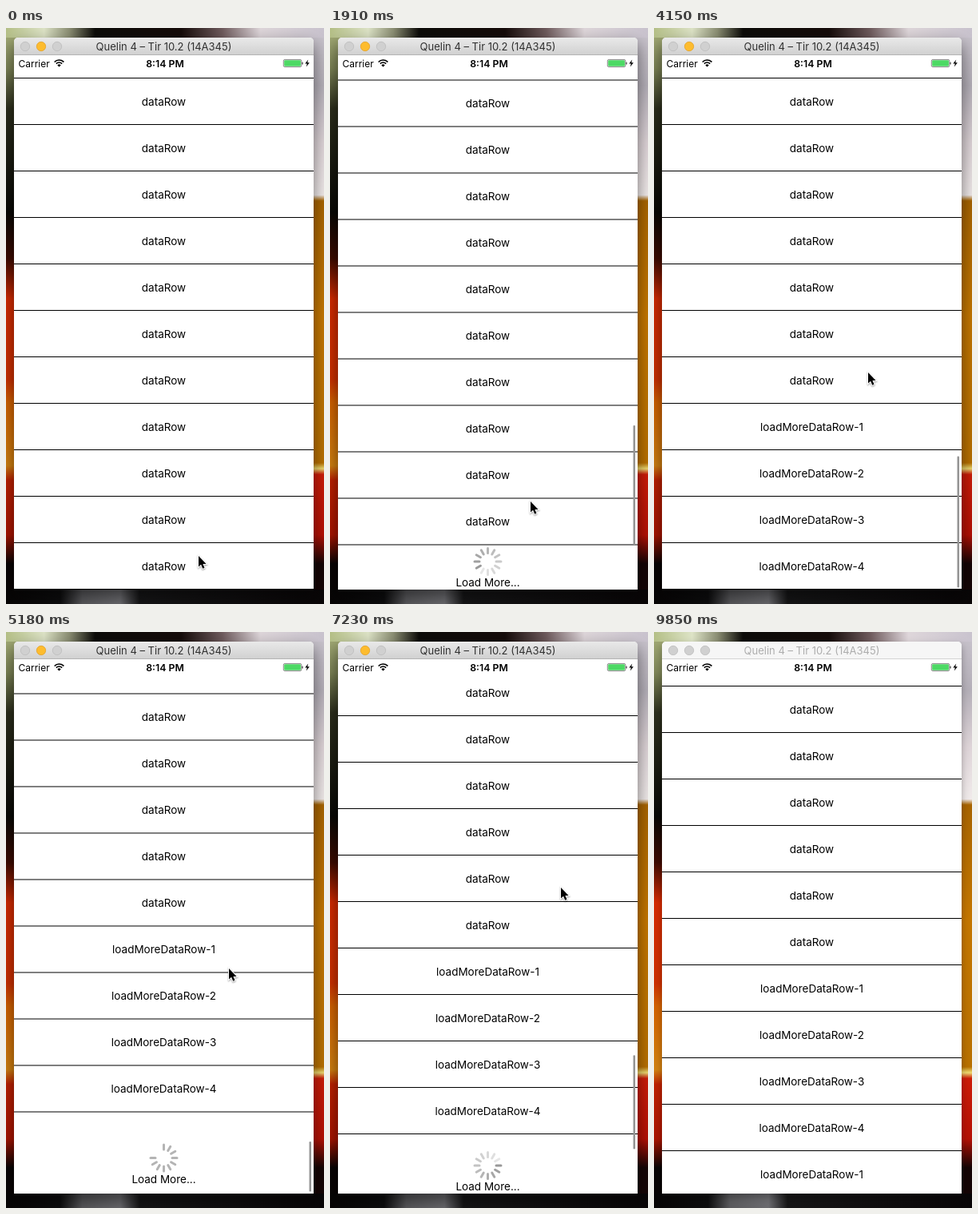
An HTML page with a canvas for the animation above (9.95 s loop, 398 px wide and 719 px high).

```html
<!DOCTYPE html>
<html lang="en">
<head>
<meta charset="utf-8">
<title>Load more list</title>
<style>
html, body { margin: 0; width: 100%; height: 100%; overflow: hidden; background: #000; }
canvas { display: block; }
</style>
</head>
<body>
<canvas id="stage" width="398" height="719"></canvas>
<script>
const ctx = document.getElementById('stage').getContext('2d');
const LOOP = 9950, STEP = 147.7, FONT = 'Inter, Roboto, sans-serif';
const LEFT = 10, WIDTH = 375, MID = 197.5, LIST_TOP = 54, BOTTOM = 701;
const ROW = 58, LIST_END = 700, FOOTER = 53, LOAD_STEPS = 14, PAGE = 4;

// The pointer drags up to `top`, lets go at `peak`, then goes to `home`.
// The list moves by `depth` and springs back to `rest`; times are in steps.
const gestures = [
  { start: 0, peak: 8, leave: 10, depth: 172.5, rest: FOOTER, top: [282, 325], home: [245, 640] },
  { start: 24, peak: 28, leave: 28, depth: 179, rest: 179, top: [268, 430], home: [240, 655] },
  { start: 32, peak: 35, leave: 38, depth: 101.5, rest: 0, top: [279, 420], home: [228, 660] },
  { start: 44, peak: 47, leave: 59, depth: 150, rest: FOOTER, top: [289, 319], home: [365, 680] }
];
const reloads = gestures.filter(g => g.rest === FOOTER);

function ease(n, from, to) {
  const p = Math.min(1, Math.max(0, (n - from) / (to - from)));
  return p * p * (3 - 2 * p);
}

function pull(g, n) {
  if (n < g.peak) return g.depth * ease(n, g.start, g.peak);
  return g.rest + (g.depth - g.rest) * Math.exp(-.77 * (n - g.peak));
}

function pointer(n) {
  const mix = (a, b, p) => a.map((v, i) => v + (b[i] - v) * p);
  return gestures.reduce((pos, g) => {
    const dragged = mix(pos, g.top, ease(n, g.start, g.peak));
    return mix(dragged, g.home, ease(n, g.leave, g.leave + 4));
  }, [241, 659]);
}

function rect(x, y, w, h, fill, r = 0) {
  ctx.fillStyle = fill;
  ctx.beginPath();
  ctx.roundRect(x, y, w, h, r);
  ctx.fill();
}

function text(str, x, y, size, color = '#000', weight = 400, align = 'center') {
  ctx.font = `${weight} ${size}px ${FONT}`;
  ctx.textAlign = align;
  ctx.fillStyle = color;
  ctx.fillText(str, x, y);
}

function gradient(x, y, stops) {
  const g = ctx.createLinearGradient(0, 0, x, y);
  stops.forEach(([p, c]) => g.addColorStop(p, c));
  return g;
}

function drawBackdrop(active) {
  rect(0, 0, 398, 12, gradient(398, 0, [[0, '#b4bf86'], [.12, '#dde3c6'], [.2, '#8a8d72'],
    [.28, '#0c0b08'], [.55, '#150b09'], [.68, '#6e5a5c'], [.8, '#ded6da'], [1, '#c9c3ce']]));
  rect(0, 12, 18, 707, gradient(0, 719, [[0, '#a8b07a'], [.07, '#7d8456'], [.14, '#2c2e1c'],
    [.32, '#080805'], [.4, '#3d0b00'], [.47, '#d42a00'], [.61, '#cc3000'], [.65, '#d26200'],
    [.76, '#d08010'], [.785, '#bd2000'], [.88, '#a81400'], [.93, '#080404']]));
  rect(380, 12, 18, 707, gradient(0, 719, [[0, '#c9c4cd'], [.1, '#b4afb8'], [.2, '#ded4d8'],
    [.29, '#f0eaea'], [.3, '#a86400'], [.5, '#c47600'], [.755, '#b87000'], [.765, '#eedb70'],
    [.775, '#cc1c08'], [.88, '#b41004'], [.93, '#140404']]));
  rect(0, 701, 398, 18, gradient(398, 0, [[0, '#060404'], [.17, '#0c0c0d'], [.24, '#59595c'],
    [.36, '#6a6a6e'], [.42, '#151516'], [1, '#080506']]));
  ctx.save();
  ctx.shadowColor = `rgba(0,0,0,${active ? .5 : .3})`;
  ctx.shadowBlur = active ? 20 : 10;
  ctx.shadowOffsetY = active ? 8 : 4;
  rect(LEFT, 12, WIDTH, 689, '#fff', [5, 5, 0, 0]);
  ctx.restore();
}

function drawTitle(active) {
  const fill = active ? gradient(0, 34, [[.35, '#e9e9e9'], [1, '#d0d0d0']]) : '#f6f6f6';
  rect(LEFT, 12, WIDTH, 22, fill, [5, 5, 0, 0]);
  rect(LEFT, 33, WIDTH, 1, active ? '#b4b4b4' : '#d4d4d4');
  ctx.lineWidth = .8;
  for (let i = 0; i < 3; i++) {
    const lit = active && i === 1;
    ctx.beginPath();
    ctx.arc(24 + i * 20, 23, 5.7, 0, 7);
    ctx.fillStyle = lit ? '#fdbc2e' : '#d0d0d0';
    ctx.strokeStyle = lit ? '#e2a12a' : '#bdbdbd';
    ctx.fill();
    ctx.stroke();
  }
  text('Quelin 4 – Tir 10.2 (14A345)', MID, 28, 13, active ? '#303030' : '#adadad');
}

function drawStatus() {
  text('Carrier', 15.5, 48.5, 12, '#000', 400, 'left');
  text('8:14 PM', 199, 48.5, 12.3, '#000', 600);
  const from = -Math.PI * .76, to = -Math.PI * .24;
  ctx.strokeStyle = ctx.fillStyle = '#000';
  ctx.lineWidth = 1.7;
  for (const r of [8, 5]) {
    ctx.beginPath();
    ctx.arc(66.5, 48, r, from, to);
    ctx.stroke();
  }
  ctx.beginPath();
  ctx.moveTo(66.5, 48.5);
  ctx.arc(66.5, 48.5, 3, from, to);
  ctx.fill();
  ctx.fill(new Path2D('M378.2 39.5 L374.3 44.6 H376.8 L375.8 48.5 L379.8 43.3 H377.2Z'));
  ctx.strokeStyle = '#555';
  ctx.lineWidth = .7;
  ctx.beginPath();
  ctx.roundRect(347.3, 39.4, 22.5, 9.2, 1.8);
  ctx.stroke();
  rect(348.2, 40.3, 20.7, 7.4, '#4cd964', 1);
  rect(370.4, 42.4, 1.2, 3.2, '#333', .6);
}

function drawSpinner(y, spokes, shadeOf) {
  ctx.save();
  ctx.translate(MID, y);
  ctx.lineWidth = 3;
  ctx.lineCap = 'round';
  for (let i = 0; i < spokes; i++) {
    const shade = shadeOf(i);
    ctx.strokeStyle = `rgb(${shade},${shade},${shade})`;
    ctx.beginPath();
    ctx.moveTo(0, -10.5);
    ctx.lineTo(0, -16.5);
    ctx.stroke();
    ctx.rotate(Math.PI / 6);
  }
  ctx.restore();
}

function drawFooter(end, n, busy) {
  const y = busy ? 666 : end + 58;
  if (busy) {
    const head = Math.floor((n - busy.peak) * STEP * .012);
    drawSpinner(y, 12, i => 153 + (i - head + 48) % 12 * 7);
  } else {
    // Spokes appear one by one as the list is pulled
    drawSpinner(y, Math.min(12, Math.floor((LIST_END - end) / 10)), () => 180);
  }
  text('Load More...', MID, y + 31, 13.5);
}

function drawBar(end, n, busy, rows) {
  const rest = LIST_END - (busy ? FOOTER : 0), over = rest - end;
  const view = rest + 1 - LIST_TOP, scale = view / (rows * ROW);
  const length = Math.max(7, view * scale - Math.max(0, over));
  const foot = rest - 1.5 + Math.min(0, over) * scale;
  ctx.globalAlpha = Math.max(...gestures.map(g =>
    ease(n, g.start, g.start + 1) * (1 - ease(n, g.peak + 7, g.peak + 9))));
  rect(379.5, foot - length, 2.5, length, '#949494', 1.2);
}

function drawList(n) {
  const added = PAGE * reloads.filter(g => n >= g.peak + LOAD_STEPS).length;
  const busy = reloads.find(g => n >= g.peak && n < g.peak + LOAD_STEPS);
  const moved = gestures.reduce((sum, g) => sum + pull(g, n), 0);
  const end = Math.round((LIST_END + added * ROW - moved) * 2) / 2;
  ctx.save();
  ctx.beginPath();
  ctx.rect(LEFT, LIST_TOP, WIDTH, BOTTOM - LIST_TOP);
  ctx.clip();
  for (let i = 0, y = end; y > LIST_TOP - ROW; i++, y -= ROW) {
    rect(LEFT, y, WIDTH, 1, '#000');
    const label = i < added ? 'loadMoreDataRow-' + (PAGE - i % PAGE) : 'dataRow';
    text(label, MID, y - ROW + 34.5, 13.5);
  }
  drawFooter(end, n, busy);
  drawBar(end, n, busy, 40 + added);
  ctx.restore();
}

function drawPointer(n) {
  const [x, y] = pointer(n).map(Math.round);
  const arrow = new Path2D('M0 0 V13.5 L3.1 10.7 L5.2 15.7 L7.5 14.7 L5.4 9.9 H9.6Z');
  ctx.save();
  ctx.translate(x, y);
  ctx.shadowColor = 'rgba(0,0,0,.4)';
  ctx.shadowBlur = 2;
  ctx.shadowOffsetY = 1;
  ctx.strokeStyle = '#fff';
  ctx.lineWidth = 2;
  ctx.stroke(arrow);
  ctx.shadowColor = 'transparent';
  ctx.fillStyle = '#000';
  ctx.fill(arrow);
  ctx.restore();
}

function draw(now) {
  const t = now % LOOP, active = t < 9850;
  const n = Math.floor((t + 14) / STEP);
  drawBackdrop(active);
  drawTitle(active);
  drawStatus();
  drawList(n);
  if (n < 64) drawPointer(n);
  requestAnimationFrame(() => draw(performance.now()));
}
draw(0);
</script>
</body>
</html>
```
